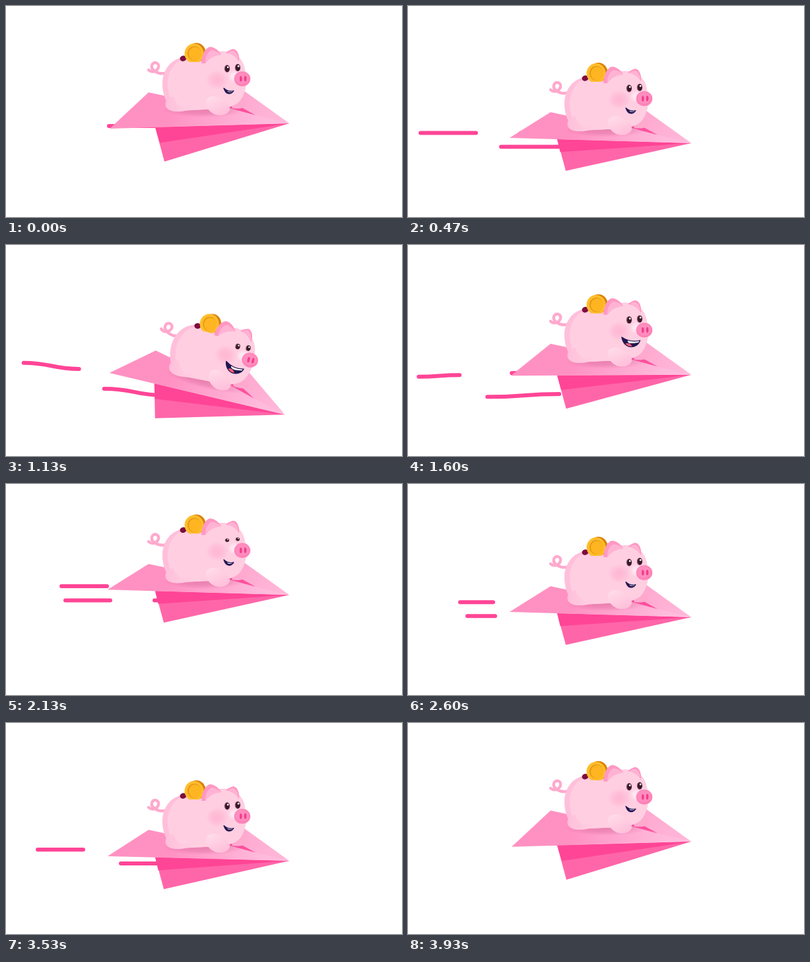
These frames come from a looping animation (600x320 px, 3.99 s). An HTML page with a canvas:

```html
<!DOCTYPE html>
<html lang="en">
<head>
<meta charset="utf-8">
<title>Flying piggy bank</title>
<style>
html, body { margin: 0; width: 100%; height: 100%; overflow: hidden; background: #fff; }
canvas { display: block; width: 600px; height: 320px; }
</style>
</head>
<body>
<canvas id="stage" width="600" height="320"></canvas>
<script>
const g = document.getElementById('stage').getContext('2d');
const LOOP = 3990, STEP = 1000 / 15, STEPS = 60;
const PIVOT = { x: 300, y: 166 };
const RIGHT = 235; // dashes start here, hidden behind the keel

const clamp = (v, a, b) => Math.max(a, Math.min(b, v));
const smooth = (f, a, b) => {
  const u = clamp((f - a) / (b - a), 0, 1);
  return u * u * (3 - 2 * u);
};
const bump = (f, a, b) => Math.sin(Math.PI * clamp((f - a) / (b - a), 0, 1)) ** 2;

// Eases from one turning point [step, value] to the next.
const sway = (...turns) => f => turns.slice(1).reduce(
  (y, [x, v], i) => y + (v - turns[i][1]) * smooth(f, turns[i][0], x), turns[0][1]);

const lift = sway([0, 0], [7, 30], [13.1, -5], [20.2, 88], [27, -30], [39, 24], [46, -5], [53, 31], [60, 0]);
const wind = sway([0, 182], [7, 192.5], [13.5, 172], [21.5, 215], [28.5, 148], [40, 180], [47, 170], [53, 192], [60, 182]);
const tilt = f => 15 * bump(f, 12, 24);
const flap = f => 15 * bump(f, 11, 29.5) - 16 * smooth(f, 0, 7) * (1 - smooth(f, 52, 59));
const grin = f => smooth(f, 12, 16) * (1 - smooth(f, 23, 30));
const lids = f => 1 - 0.25 * bump(f, 12, 24) - 0.8 * bump(f, 28.5, 33.5);

// Each dash: front position at the start of a pass, speed per step, length.
const ROWS = [
  { left: 16, dashes: [[153, 36, 75], [345, 47, 90], [490, 46, 56]] },
  { left: 87, dashes: [[231, 72, 74], [324, 51, 115], [488, 50, 97]] }
];
const PASS = 10;

function poly(fill, ...pts) {
  g.beginPath();
  pts.forEach(p => g.lineTo(p[0], p[1]));
  g.closePath();
  g.fillStyle = fill;
  g.fill();
}
function oval(fill, x, y, rx, ry, turn = 0) {
  g.beginPath();
  g.ellipse(x, y, rx, ry, turn, 0, Math.PI * 2);
  g.fillStyle = fill;
  g.fill();
}
function shape(fill, d) {
  g.fillStyle = fill;
  g.fill(new Path2D(d));
}
function line(color, width, d) {
  g.strokeStyle = color;
  g.lineWidth = width;
  g.lineCap = g.lineJoin = 'round';
  g.stroke(new Path2D(d));
}
function ramp(x0, y0, x1, y1, a, b) {
  const r = g.createLinearGradient(x0, y0, x1, y1);
  r.addColorStop(0, a);
  r.addColorStop(1, b);
  return r;
}
function glow(x, y, rx, ry, rgb, alpha) {
  g.save();
  g.translate(x, y);
  g.scale(rx, ry);
  const r = g.createRadialGradient(0, 0, 0, 0, 0, 1);
  r.addColorStop(0, `rgba(${rgb},${alpha})`);
  r.addColorStop(0.5, `rgba(${rgb},${alpha * 0.7})`);
  r.addColorStop(1, `rgba(${rgb},0)`);
  oval(r, 0, 0, 1, 1);
  g.restore();
}

function drawWind(f) {
  const slope = 0.11 * bump(f, 12, 22) - 0.04 * bump(f, 20, 28);
  const gap = 21 + 14 * bump(f, 13, 33);
  const shift = slope * 70;
  for (let start = 0; start <= STEPS; start += PASS) {
    const p = f - start;
    const ending = start === STEPS - PASS;
    ROWS.forEach(({ left, dashes }, row) => dashes.forEach(([front, speed, len], i) => {
      if (ending && i === 2) return;
      const head = front - speed * p;
      const x0 = clamp(head, left, RIGHT) + 3 + shift;
      const x1 = clamp(head + len, left, RIGHT) - 3 + shift;
      if (x1 < x0) return;
      const at = x => wind(f) + row * gap + slope * (x - 125);
      const mid = (x0 + x1) / 2, y0 = at(x0), y1 = at(x1);
      line('#ff4596', 6, `M${x0} ${y0}C${mid} ${y0} ${mid} ${y1} ${x1} ${y1}`);
    }));
  }
}

function drawPlane(w) {
  const tip = [429.3, 178];
  const corner = [157 + w * 0.2, 186 + w];
  const low = [240 + w * 0.06, 236 + w];
  const hinge = [226, 183.8 + w * 0.745];
  const fold = [233 + w * 0.15, 207.5 + w];
  poly('#ff66a9', hinge, tip, low);
  poly('#ff4596', hinge, tip, fold);
  poly(ramp(340, 130, 425, 178, '#ffa5cd', '#ffb9da'), [335, 110], [350, 121], tip, [330, 158]);
  poly(ramp(250, 150, 390, 178, '#ff91c2', '#ffbbdc'), corner, [216, 131], [378, 165.5], tip);
  poly('#ff4f9d', [332, 153], [350, 150], [378, 165.5]);
  glow(300, 158, 62, 11, '205,85,140', 0.42);
}

const BODY = 'M237 118C237 97 250 80 269 78C284 77 296 81 304 77C312 71 322 68 333 69' +
  'C350 71 360 82 362 97C366 112 364 128 357 140C350 153 330 157 302 157L262 159C246 156 237 138 237 118Z';

function drawCoin() {
  oval('#7d0e3e', 268.5, 79.5, 5, 4.2, -0.25);
  g.save();
  g.beginPath();
  g.rect(264, 50, 40, 35);
  g.clip();
  oval('#d98108', 288.5, 70.5, 14, 14.5);
  oval('#ffbd2e', 285, 72, 14.5, 15);
  oval('#e59a13', 285.5, 72, 10.5, 11);
  oval('#ffb522', 286.5, 72.5, 9.6, 10.2);
  g.restore();
}

function drawMouth(m) {
  const lx = 330 - 6.5 * m, ly = 124.5 - 3.5 * m;
  const rx = 345 + 7 * m, ry = 128.5 - 2.5 * m;
  const low = 135 + 4.5 * m;
  const lip = `Q337 ${131 - m} ${rx} ${ry}`;
  const d = `M${lx} ${ly}${lip}C${rx - 4} ${low} ${lx + 3} ${low + m} ${lx} ${ly}Z`;
  const path = new Path2D(d);
  g.save();
  g.fillStyle = '#211650';
  g.fill(path);
  g.clip(path);
  oval('#ff5f77', 334, 133 + m, 3 + 2.5 * m, 2 + 1.5 * m, 0.4);
  line('#fff', 2 + 2.5 * m, `M${336 - m} ${128 - m}${lip}`);
  g.restore();
  line('#211650', 1.2, d);
}

function drawEye(x, y, open) {
  g.save();
  g.translate(x, y);
  g.scale(0.55 + 0.45 * open, Math.max(0.14, open));
  oval('#8d5363', 0, 0, 4.2, 5.7);
  oval('#35172a', 0.4, 0, 3.3, 5);
  oval('#fff', 1.2, -2.2, 1.4, 1.5);
  g.restore();
}

function drawPig(m, open) {
  line('#ffa9cd', 4.4, 'M241 102C230 104 219 97 221 90C223 83 233 86 231 93C229 99 221 102 216 97');

  // far front foot
  shape('#ffa9ce', 'M340 146C348 136 362 138 365 147C366 154 356 157 343 155Z');

  const body = new Path2D(BODY);
  g.save();
  g.fillStyle = '#ffbfda';
  g.fill(body);
  g.clip(body);
  g.translate(8, 0);
  g.fillStyle = '#ffcee1';
  g.fill(body);
  g.restore();

  drawCoin();

  // near feet
  shape(ramp(242, 150, 270, 148, '#ffbfda', '#ffcbe0'),
    'M243 143C250 133 270 137 278 147C284 154 275 160 262 160C247 161 238 154 243 143Z');
  shape('#ffcee1', 'M253 130C268 130 282 142 282 151L266 153C258 148 252 140 253 130Z');
  shape(ramp(312, 136, 326, 166, '#ffdce9', '#ffbfda'),
    'M303 145C304 135 319 135 326 141C334 146 340 151 339 157C337 166 321 168 314 163C308 160 302 153 303 145Z');

  // ears
  shape('#ff98c3', 'M296 87C297 74 301 64 309 62C316 62 323 68 326 74C315 74 307 79 302 87Z');
  shape('#ffb3d4', 'M302 87C302 76 306 69 312 67C318 68 323 71 326 74C315 75 307 80 302 87Z');
  shape('#ff98c3', 'M333 71C338 67 344 64 347 66C352 69 354 77 353 84C348 76 342 72 333 71Z');
  shape('#ffb3d4', 'M336 71C341 68 344 67 346 69C350 72 352 77 352 82C347 75 342 72 336 71Z');

  glow(320, 112, 17, 15, '255,150,190', 0.42);
  glow(346, 107, 10, 10, '255,240,247', 0.9);
  drawEye(335, 95, open);
  drawEye(351, 93.5, open);

  // snout
  oval('#ff82b7', 358, 110.5, 12.3, 11.2);
  oval('#ff8dbe', 357.5, 109.5, 10.5, 9);
  oval('#f23e8b', 355.8, 110.5, 1.8, 4.3);
  oval('#f23e8b', 362.6, 110.2, 1.8, 4.3);

  drawMouth(m);
}

function draw(now) {
  const f = Math.floor(((now % LOOP) + 3.4) / STEP) % STEPS;
  g.fillStyle = '#fff';
  g.fillRect(0, 0, 600, 320);
  drawWind(f);
  g.save();
  g.translate(PIVOT.x, PIVOT.y + lift(f));
  g.rotate(tilt(f) * Math.PI / 180);
  g.translate(-PIVOT.x, -PIVOT.y);
  drawPlane(flap(f));
  drawPig(grin(f), lids(f));
  g.restore();
}

const start = performance.now();
function tick() {
  draw(performance.now() - start);
  requestAnimationFrame(tick);
}
tick();
</script>
</body>
</html>
```
